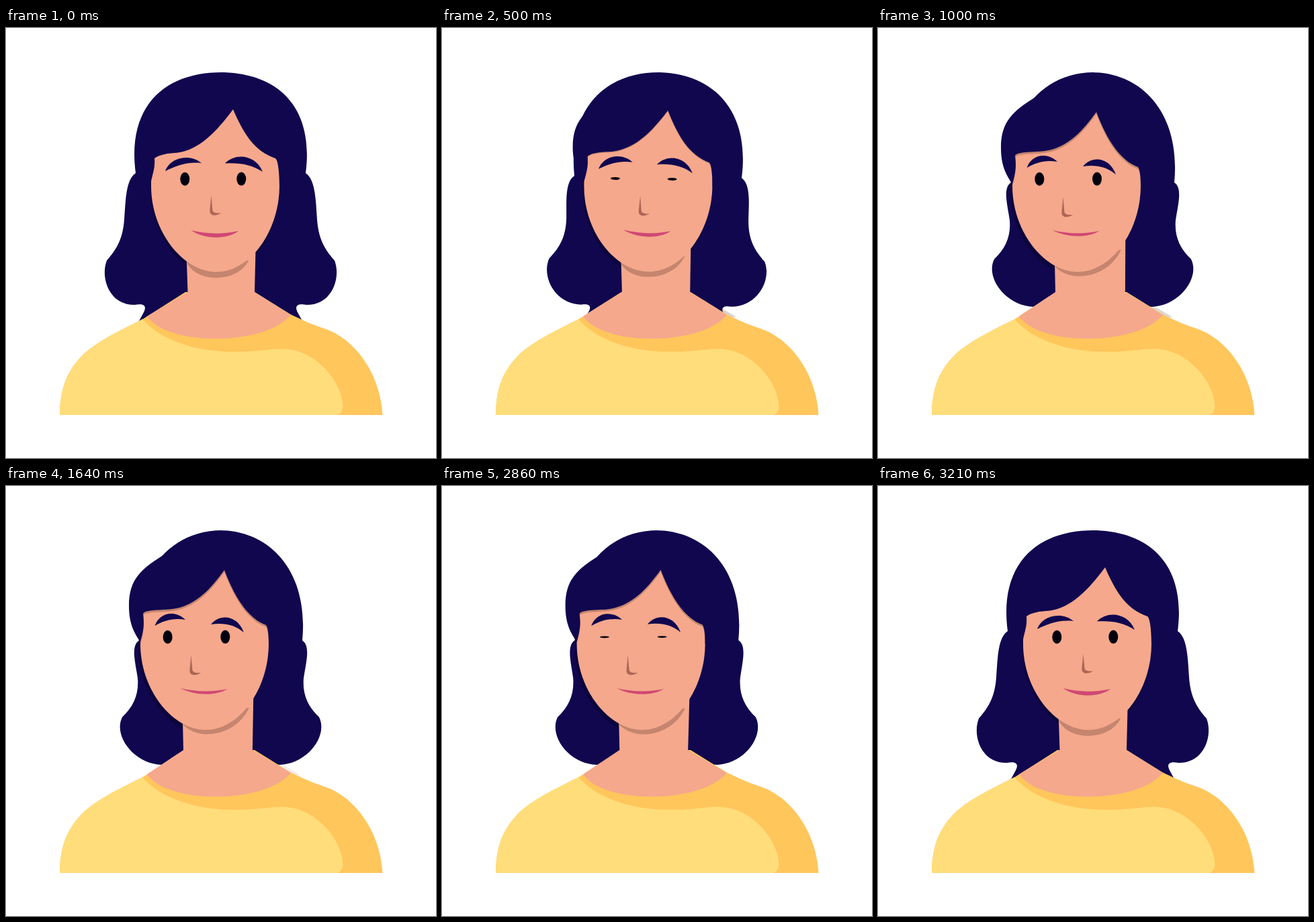
Write an HTML page that moves like this. It is 640 px wide and 640 px high and loops after 4.78 s.

```html
<!DOCTYPE html>
<html lang="en">
<head>
<meta charset="utf-8">
<title>Portrait</title>
<style>
  html, body { margin: 0; width: 100%; height: 100%; overflow: hidden; background: #fff; }
  svg { display: block; width: 100%; height: 100%; }
  .hair { fill: #10074f; }
  .skin { fill: #f5a88c; }
  .shade { fill: #c5856e; }
  .eye { fill: #02010f; }
  .shirt { fill: #ffc65c; }
</style>
</head>
<body>
<svg viewBox="0 0 640 640">
  <defs>
    <path id="faceShape" d="M216 185L340 108L407 185V235C407 300 365 363 313 363C265 363 216 305 216 235Z"/>
    <clipPath id="faceClip"><use href="#faceShape"/></clipPath>
  </defs>

  <path id="sliver" fill="#d9d3cb" d="M404 414L415 416.500L438 430L430 431Z"/>

  <g id="backHair" class="hair">
    <path id="hairLeft"/>
    <path id="hairRight" transform="translate(639 0) scale(-1 1)"/>
    <use id="hairShade" href="#faceShape" fill="#000" opacity=".25"/>
  </g>

  <path class="shirt" d="M80 576C80 535 92 510 112 489C132 468 170 450 204 433L267 393H370L424 426.500C440 434 452 440 470 446C520 461 557 515 560.500 576Z"/>
  <path fill="#ffdd7a" d="M80 576C80 535 92 510 112 489C132 468 170 450 203 433.500C228 462 277 482 340 482C372 482 390 478 410 477.500C462 477 500 528 501.500 562C501.500 570 498 575 493 576Z"/>
  <path id="neck" class="skin"/>
  <path id="neckShade" class="shade"/>

  <g id="head">
    <g id="face">
      <use href="#faceShape" class="skin"/>
      <g clip-path="url(#faceClip)"><path id="fringeShade" class="shade"/></g>
    </g>
    <path id="fringe" class="hair"/>
    <path id="browLeft" class="hair"/>
    <path id="browRight" class="hair"/>
    <ellipse id="eyeLeft" class="eye" rx="7"/>
    <ellipse id="eyeRight" class="eye" rx="7"/>
    <path id="nose" fill="#ad6656" d="M305.500 249L303.500 270C302 280 311 281 320 275.500C313 276 309 275 307.500 272Z"/>
    <path id="mouth" fill="#cf4873"/>
  </g>
</svg>

<script>
const LOOP = 4780, START = 430, STEP = 71.25, LAST = 40;

// Each shape: facing forward, then turned to the side.
const backHair = [
  'M321 66 C234 66 180 118 193 216 C178 226 178 258 176 285 C174 312 166 328 150 346 C140 372 154 413 192 412 C202 410 212 411 204 425 L198 436 L321 436 Z',
  'M321 66 C248 66 188 125 198 230 C185 238 193 265 196 286 C198 310 190 328 173 344 C159 372 191 414 232 415 C238 414 246 416 240 425 L236 430 L321 430 Z'
];
const shapes = {
  hairLeft: backHair,
  hairRight: backHair,
  neckShade: [
    'M268.5 348 C282 380 345 380 361 346 L313 340 Z',
    'M262.5 354 C284 380 341 374 362 330 L297 340 Z'
  ],
  fringe: [
    'M216 228 C206 212 198 200 198 178 C198 140 216 124 250 103 C290 72 360 72 405 130 L425 230 L407 235 C407 215 405 197 401 194 C370 183 355 160 338 121 C312 156 285 184 250 186 C235 187 226 190 221 194 C222 208 219 214 216 228 Z',
    'M200 232 C190 218 183 204 183 178 C183 140 200 124 234 103 C280 70 350 70 400 130 L420 230 L391 235 C391 222 390 211 387 207 C360 197 340 165 325 125 C300 160 275 184 235 184 C215 185 206 186 204 190 C206 205 205 215 200 232 Z'
  ],
  browLeft: [
    'M237 213 C244 193 273 186 291 201 C270 199 252 205 237 213 Z',
    'M221.5 208 C229 187 253 185 267 199 C249 196 236 200 221.5 208 Z'
  ],
  browRight: [
    'M326 201.5 C342 185 372 189 382 214 C366 203 346 200 326 201.5 Z',
    'M305 206 C318 189 345 192 354 218 C341 206 322 203 305 206 Z'
  ],
  mouth: [
    'M275.5 301 C298 307 325 307 346 302 C330 315 295 315 275.5 301 Z',
    'M259.5 301 C283 306.5 308 307 329.5 302 C313 312.5 282 312.5 259.5 301 Z'
  ]
};

const turnOut = [0, .14, .4, .7, .88, .96, .99, 1];
const turnBack = [1, .96, .84, .6, .3, .08, 0];
const tilts = [0, 0, .8, 1.6, 2, 1.4, .7, .2];
const lids = { 1: .2, 2: .2, 3: .65, 34: .55, 35: .14, 36: .4, 37: .8 };

const el = id => document.getElementById(id);
const set = (id, attrs) => {
  for (const name in attrs) el(id).setAttribute(name, attrs[name]);
};
const mix = (a, b, p) => a + (b - a) * p;
const clamp = v => Math.max(0, Math.min(1, v));

function morph([from, to], p) {
  const ends = to.match(/[\d.]+/g);
  let i = 0;
  return from.replace(/[\d.]+/g, n => mix(+n, +ends[i++], p).toFixed(2));
}

function stepAt(t) {
  if (t < START) return 0;
  return Math.min(LAST, Math.floor((t - START + 6) / STEP) + 1);
}

function draw(k) {
  const turn = k < 34 ? turnOut[Math.min(k, 7)] : turnBack[k - 34];
  const drift = clamp((k - 8) / 18);
  const tilt = `rotate(${tilts[k] || 0} 318 365)`;
  const ry = 10 * (lids[k] || 1);

  for (const id in shapes) el(id).setAttribute('d', morph(shapes[id], turn));
  set('fringeShade', {
    d: el('fringe').getAttribute('d'),
    transform: `translate(${16 * turn} ${3 * turn})`
  });
  set('face', { transform: `translate(${-16 * turn} 0)` });
  set('hairShade', { transform: `translate(${-1 - 18 * turn} 6)` });
  set('nose', { transform: `translate(${-30 * turn} ${2.5 * turn})` });
  set('head', { transform: tilt });
  set('backHair', { transform: tilt });

  const slide = .6 * drift * turn;
  set('eyeLeft', { cx: mix(266.3, 240.3, turn) + slide, cy: 224.8, ry });
  set('eyeRight', { cx: mix(350.3, 326, turn) + slide, cy: 224.6, ry });

  const left = mix(270.5, 264, turn);
  const right = 370 - (2 + 2 * drift) * turn;
  set('neck', {
    d: `M${mix(268.5, 262.7, turn)} 335L${left} 393L210 429C240 474 385 474 424 427` +
       `L${right} 393L${mix(372, 368.3, turn)} 310Z`
  });
  set('sliver', { opacity: k < 30 ? clamp((25 - k) / 18) : 0 });
}

let shown = -1;
function tick() {
  const k = stepAt(performance.now() % LOOP);
  if (k !== shown) draw(shown = k);
  requestAnimationFrame(tick);
}
tick();
</script>
</body>
</html>
```
